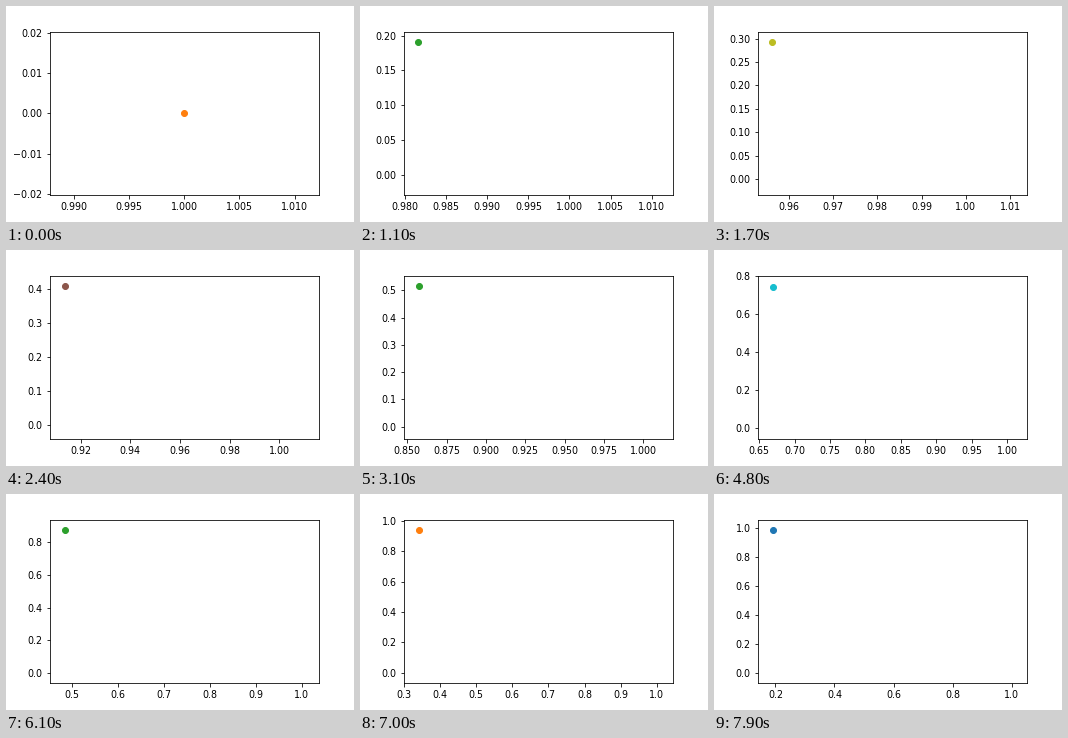
Recreate the animation shown at these times as a matplotlib script. Size 348x216 px, loop 8000 ms.

```python
import numpy as np
import matplotlib.pyplot as plt
from matplotlib.animation import FuncAnimation
from matplotlib.ticker import MaxNLocator

DPI = 72
FRAMES = 80
MARGIN = 0.05
RADIUS = 3  # marker radius in pixels

plt.rcParams.update({
    "font.family": "DejaVu Sans",
    "xtick.labelsize": 9.5,
    "ytick.labelsize": 9.5,
    "figure.subplot.bottom": 0.125,
})

fig, ax = plt.subplots(figsize=(348 / DPI, 216 / DPI), dpi=DPI)
for axis in (ax.xaxis, ax.yaxis):
    axis.set_major_locator(MaxNLocator(nbins=8, steps=[1, 2, 2.5, 5, 10]))

angles = np.radians(np.arange(FRAMES))
points = np.column_stack([np.cos(angles), np.sin(angles)])
size = np.array([0.775 * 348, 0.755 * 216])


def growing_views():
    """Limits that keep every past marker, padded by its size in the last view."""
    low, high = np.full(2, np.inf), np.full(2, -np.inf)
    span = np.ones(2)
    views = []
    for point in np.vstack([points[:1], points]):
        pad = RADIUS * span / size
        low = np.minimum(low, point - pad)
        high = np.maximum(high, point + pad)
        extra = MARGIN * (high - low)
        span = high - low + 2 * extra
        views.append((low - extra, high + extra))
    return views[1:]


def reach_ticks(axis, low, high, pixels):
    """Widen the limits to ticks lying less than half a pixel outside."""
    slack = 0.5 * (high - low) / pixels
    ticks = axis.get_major_locator().tick_values(low, high)
    near = ticks[(ticks >= low - slack) & (ticks <= high + slack)]
    return min(low, near.min()), max(high, near.max())


views = growing_views()
dot = ax.scatter([1], [0], s=(2 * RADIUS) ** 2)


def update(i):
    low, high = views[i]
    ax.set_xlim(reach_ticks(ax.xaxis, low[0], high[0], size[0]))
    ax.set_ylim(reach_ticks(ax.yaxis, low[1], high[1], size[1]))
    dot.set_offsets(points[i:i + 1])
    dot.set_color(f"C{(i + 1) % 10}")
    return [dot]


anim = FuncAnimation(fig, update, frames=FRAMES, interval=100,
                     init_func=lambda: update(0), repeat_delay=0)
plt.show()
```
